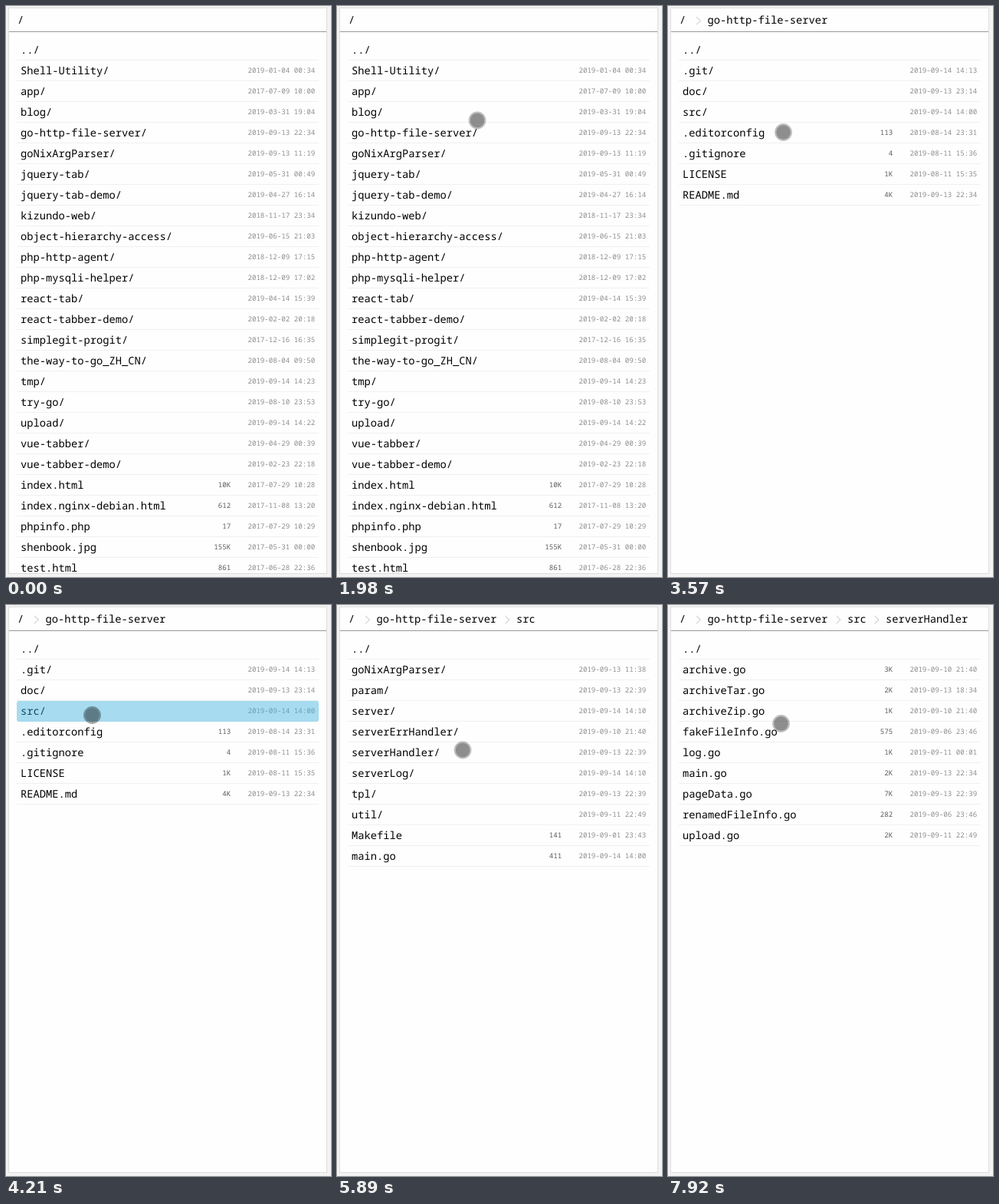
These frames come from a looping animation (424 by 744 pixels, 8 s). An HTML page:

```html
<!DOCTYPE html>
<html lang="en">
<head>
<meta charset="utf-8">
<title>File listing</title>
<style>
  html, body { margin: 0; width: 100%; height: 100%; overflow: hidden; background: #f3f3f3; }
  svg { display: block; }
  text { font: 13.75px "Noto Sans Mono", monospace; fill: #000; text-rendering: geometricPrecision; }
  .date, .size { font-size: 9.17px; text-anchor: end; fill: #8e8e8e; }
  .size { fill: #5c5c5c; }
  .chevron { fill: none; stroke: #c0c0c0; }
  .ring { fill: none; stroke: #000; stroke-width: 2; stroke-opacity: .25; }
  .pressed .ring { stroke-opacity: .35; }
</style>
</head>
<body>
<svg width="424" height="744" viewBox="0 0 424 744">
  <rect x="3.5" y="2.5" width="415" height="737" fill="#fefefe" stroke="#ddd"/>
  <path d="M4 33.5H418" stroke="#999"/>
  <rect id="hover" x="14" width="394" height="27" rx="3" fill="#f5f5f5"/>
  <g id="list"></g>
  <rect id="tap" x="14" width="394" height="27" rx="3" fill="rgb(51,181,229)" fill-opacity=".4"/>
  <g id="pointer">
    <circle r="9.4" fill="#000" fill-opacity=".44"/>
    <circle class="ring" r="10.4"/>
  </g>
</svg>
<script>
const LOOP = 8000, STEP = 120, ROW = 27, TOP = 44;
const CRUMBS = [["/", 15], ["go-http-file-server", 51.5], ["src", 234], ["serverHandler", 284]];

// Each row: name | size | date
const pages = [
  { at: 0, rows: `../
Shell-Utility/||2019-01-04 00:34
app/||2017-07-09 10:00
blog/||2019-03-31 19:04
go-http-file-server/||2019-09-13 22:34
goNixArgParser/||2019-09-13 11:19
jquery-tab/||2019-05-31 00:49
jquery-tab-demo/||2019-04-27 16:14
kizundo-web/||2018-11-17 23:34
object-hierarchy-access/||2019-06-15 21:03
php-http-agent/||2018-12-09 17:15
php-mysqli-helper/||2018-12-09 17:02
react-tab/||2019-04-14 15:39
react-tabber-demo/||2019-02-02 20:18
simplegit-progit/||2017-12-16 16:35
the-way-to-go_ZH_CN/||2019-08-04 09:50
tmp/||2019-09-14 14:23
try-go/||2019-08-10 23:53
upload/||2019-09-14 14:22
vue-tabber/||2019-04-29 00:39
vue-tabber-demo/||2019-02-23 22:18
index.html|10K|2017-07-29 10:28
index.nginx-debian.html|612|2017-11-08 13:20
phpinfo.php|17|2017-07-29 10:29
shenbook.jpg|155K|2017-05-31 00:00
test.html|861|2017-06-28 22:36` },
  { at: 2720, rows: `../
.git/||2019-09-14 14:13
doc/||2019-09-13 23:14
src/||2019-09-14 14:00
.editorconfig|113|2019-08-14 23:31
.gitignore|4|2019-08-11 15:36
LICENSE|1K|2019-08-11 15:35
README.md|4K|2019-09-13 22:34` },
  { at: 4330, rows: `../
goNixArgParser/||2019-09-13 11:38
param/||2019-09-13 22:39
server/||2019-09-14 14:10
serverErrHandler/||2019-09-10 21:40
serverHandler/||2019-09-13 22:39
serverLog/||2019-09-14 14:10
tpl/||2019-09-13 22:39
util/||2019-09-11 22:49
Makefile|141|2019-09-01 23:43
main.go|411|2019-09-14 14:00` },
  { at: 6420, rows: `../
archive.go|3K|2019-09-10 21:40
archiveTar.go|2K|2019-09-13 18:34
archiveZip.go|1K|2019-09-10 21:40
fakeFileInfo.go|575|2019-09-06 23:46
log.go|1K|2019-09-11 00:01
main.go|2K|2019-09-13 22:34
pageData.go|7K|2019-09-13 22:39
renamedFileInfo.go|282|2019-09-06 23:46
upload.go|2K|2019-09-11 22:49` },
];

const taps = [{ at: 2600, row: 4 }, { at: 4210, row: 3 }];

// The pointer takes one point per step, then rests on the last one
const moves = [
  { at: 620, path: [[312, -8], [310.5, -1.5], [301, -9.8]] },
  { at: 1010, path: [[262, 15], [223.5, 63.5], [208, 100], [202, 123], [199.5, 134.5]] },
  { at: 1860, path: [[194, 139], [183, 149], [171, 158], [163, 163.5], [159.5, 165]] },
  { at: 3570, path: [[150.5, 164.5], [131, 156], [117, 147], [112.5, 143.5]] },
  { at: 5410, path: [[119.5, 150], [131, 161], [144, 173], [156, 183], [164, 189], [166.5, 190.5]] },
  { at: 7800, path: [[159, 175], [147.5, 154.5]] },
];

const byId = id => document.getElementById(id);
const list = byId("list"), hover = byId("hover"), tap = byId("tap"), pointer = byId("pointer");
const label = (x, y, text, kind = "") => `<text class="${kind}" x="${x}" y="${y}">${text}</text>`;
const latest = (items, t) => items.filter(item => item.at <= t).pop();

function renderRow(line, i) {
  const [name, size = "", date = ""] = line.split("|");
  const y = TOP + i * ROW;
  return `<path d="M14 ${y + 26.5}H408" stroke="#f0f0f0"/>` + label(19, y + 18, name)
    + label(293.3, y + 16, size, "size") + label(403.3, y + 16, date, "date");
}

function renderCrumb([name, x], i) {
  const chevron = i ? `<path class="chevron" d="M${x - 14.5} 14.2l5.5 5l-5.5 5"/>` : "";
  return chevron + label(x, 23, name);
}

pages.forEach((page, i) => {
  page.markup = CRUMBS.slice(0, i + 1).map(renderCrumb).join("")
    + page.rows.split("\n").map(renderRow).join("");
});

let shown;
function draw(now) {
  const t = now % LOOP;

  const page = latest(pages, t);
  if (page !== shown) list.innerHTML = (shown = page).markup;

  const press = taps.find(({ at }) => t >= at && t < at + STEP);
  pointer.classList.toggle("pressed", !!press);
  for (const box of [hover, tap]) {
    box.style.display = press ? "" : "none";
    if (press) box.setAttribute("y", TOP + press.row * ROW);
  }

  const move = latest(moves, t);
  pointer.style.display = move ? "" : "none";
  if (move) {
    const step = Math.floor((t - move.at) / STEP);
    pointer.setAttribute("transform", `translate(${move.path[Math.min(step, move.path.length - 1)]})`);
  }
  requestAnimationFrame(() => draw(performance.now() - start));
}
const start = performance.now();
draw(0);
</script>
</body>
</html>
```
